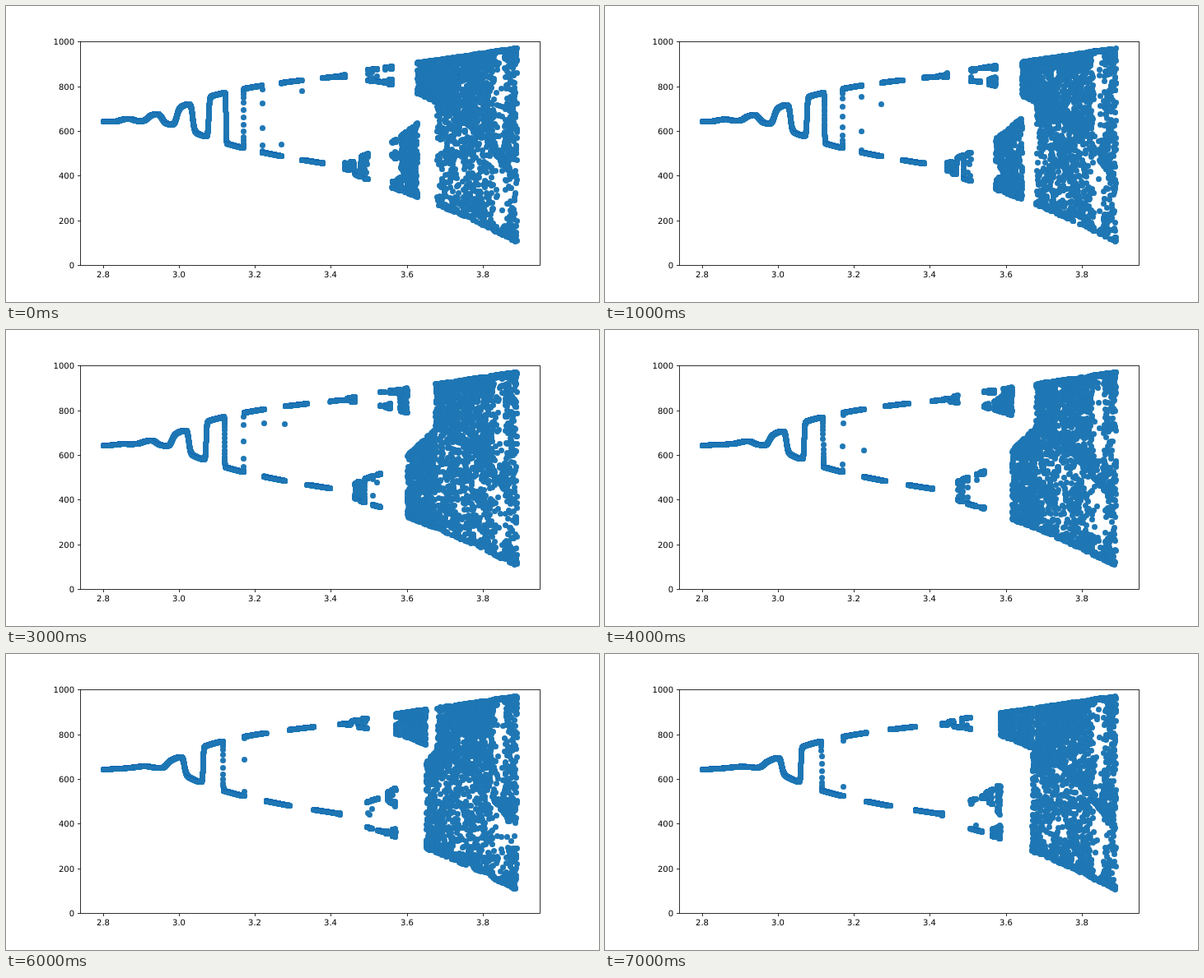
These frames come from a looping animation (720x360 px, 8000 ms). An HTML page with a canvas:

```html
<!DOCTYPE html>
<html>
<head>
<meta charset="utf-8">
<title>Logistic map after 100 generations</title>
<style>
html, body { margin: 0; width: 720px; height: 360px; overflow: hidden; background: #fff; }
canvas { display: block; }
</style>
</head>
<body>
<canvas id="plot" width="720" height="360"></canvas>
<script>
const ctx = document.getElementById('plot').getContext('2d');
const LEFT = 90, RIGHT = 648, TOP = 43, BOTTOM = 315;
const GENERATIONS = 100, CAPACITY = 1000;
const R_MIN = 2.8, R_MAX = 3.89, R_COUNT = 10000;
const R_STEP = (R_MAX - R_MIN) / (R_COUNT - 1);

const px = r => Math.round(LEFT + (r - 2.7396) * 460.84);
const py = n => Math.round(BOTTOM - n * 0.2718);

function population(start, r) {
  let n = start;
  for (let g = 0; g < GENERATIONS; g++) n = r * n * (1 - n / CAPACITY);
  return n;
}

function line(x1, y1, x2, y2) {
  ctx.beginPath();
  ctx.moveTo(x1 + 0.5, y1 + 0.5);
  ctx.lineTo(x2 + 0.5, y2 + 0.5);
  ctx.stroke();
}

function drawAxes() {
  ctx.strokeStyle = ctx.fillStyle = '#000';
  ctx.lineWidth = 0.8;
  ctx.strokeRect(LEFT + 0.5, TOP + 0.5, RIGHT - LEFT, BOTTOM - TOP);
  ctx.font = '10px "DejaVu Sans", sans-serif';
  ctx.textRendering = 'geometricPrecision';
  for (let i = 0; i < 6; i++) {
    const r = 2.8 + i * 0.2, x = px(r);
    line(x, BOTTOM, x, BOTTOM + 3.5);
    ctx.textAlign = 'center';
    ctx.fillText(r.toFixed(1), x, 330);

    const n = i * 200, y = py(n);
    line(LEFT - 3.5, y, LEFT, y);
    ctx.textAlign = 'right';
    ctx.fillText(n, 83, y + 4);
  }
}

function draw(step) {
  // The starting population grows tenfold with every step.
  const start = Number('1e-' + (35 - step));
  ctx.fillStyle = '#fff';
  ctx.fillRect(0, 0, 720, 360);
  ctx.fillStyle = '#1f77b4';
  for (let i = 0; i < R_COUNT; i++) {
    const r = R_MIN + i * R_STEP;
    ctx.beginPath();
    ctx.arc(px(r) + 0.5, py(population(start, r)) + 0.5, 3.5, 0, 2 * Math.PI);
    ctx.fill();
  }
  drawAxes();
}

let shown = -1;
function tick() {
  const step = Math.floor(performance.now() / 1000) % 8;
  if (step !== shown) draw(shown = step);
  requestAnimationFrame(tick);
}
tick();
</script>
</body>
</html>
```
